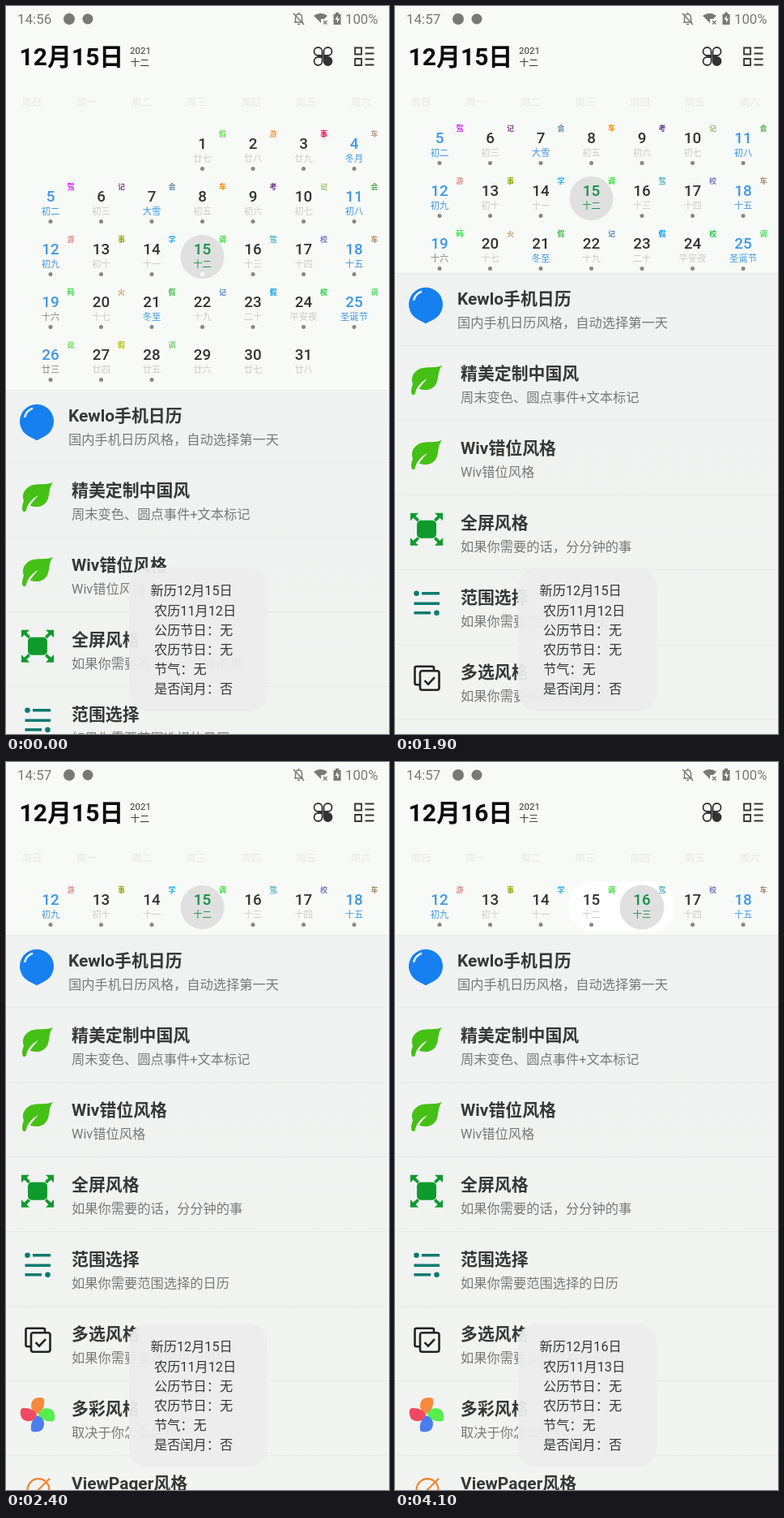
Write an HTML page that moves like this. It is 473 by 897 pixels and loops after 4400 ms.

```html
<!DOCTYPE html>
<html lang="zh-CN">
<head>
<meta charset="utf-8">
<title>日历</title>
<style>
html, body { margin: 0; width: 100%; height: 100%; overflow: hidden; background: #f7f9f7; }
svg { display: block; width: 473px; height: 897px; font-family: Roboto, "Noto Sans CJK SC", "Noto Sans CJK", sans-serif; }
text { white-space: pre; }
</style>
</head>
<body>
<svg id="stage" viewBox="0 0 473 897">
  <defs>
    <clipPath id="window"><rect y="141" width="473" height="756"/></clipPath>
    <linearGradient id="sheet" x2="0" y2="1">
      <stop stop-color="#eff2f0"/><stop offset="1" stop-color="#f2f4f2"/>
    </linearGradient>
    <path id="leaf" fill="#45c015" d="M58 -10C50 -6 40 -9 31 -6C22 -2 19 6 22 13C20 18 19.500 22 20.500 25C22 27.500 24.500 26.500 25 24C26 18 31 11 40 6C35 12 31 16 30 19C40 22.500 49 19 52 10C54 3 53 -3 58 -10Z"/>
  </defs>
  <rect width="473" height="897" fill="#f8faf8"/>
  <g id="bar"></g>
  <g id="head"></g>
  <g clip-path="url(#window)">
    <g id="month"></g>
    <g id="list"></g>
  </g>
  <g id="toast"></g>
</svg>
<script>
const LOOP = 4400;
const $ = id => document.getElementById(id);

function add(parent, tag, attrs, content) {
  const el = document.createElementNS('http://www.w3.org/2000/svg', tag);
  for (const k in attrs) el.setAttribute(k, attrs[k]);
  if (content !== undefined) el.textContent = content;
  parent.appendChild(el);
  return el;
}

// y is the visual middle of the line
const label = (parent, x, y, size, fill, content, more) =>
  add(parent, 'text', { x, y: y + size * .365, 'font-size': size, fill, ...more }, content);
const draw = (parent, d, stroke, width = 2, fill = 'none') =>
  add(parent, 'path', { d, stroke, 'stroke-width': width, fill });
const dot = (parent, cx, cy, r, fill) => add(parent, 'circle', { cx, cy, r, fill });
const mid = { 'text-anchor': 'middle' };

// Status bar
const bar = $('bar'), grey = '#777977';
const clock = label(bar, 14, 16, 17, grey, '14:56');
dot(bar, 78, 16, 7, grey);
dot(bar, 101, 16, 6.5, grey);
draw(bar, 'M356 20H367M357.500 20V14Q358 10 361.500 10Q365 10 365.500 14V20M361.500 8V10M360 22.500H363', grey, 1.5);
draw(bar, 'M355 9L368 23', grey, 1.5);
draw(bar, 'M380 12Q388.500 6 397 12L393 16H389V21Z', 'none', 0, grey);
draw(bar, 'M392 18L396.500 22.500M396.500 18L392 22.500', grey, 1.4);
draw(bar, 'M404.500 10H407V8H411V10H413.500V23H404.500Z', 'none', 0, grey);
draw(bar, 'M409.500 11.500L406.500 17H409V21L412 15.500H409.500Z', 'none', 0, '#f8faf8');
label(bar, 419, 16, 16.7, grey, '100%');

// Header
const head = $('head');
const date = label(head, 16.5, 62.5, 30, '#0c0c0c', '', { 'font-weight': 700 });
label(head, 153, 55, 11.5, '#333', '2021');
const lunarDate = label(head, 153.5, 70, 11.8, '#333', '');
const petal = 'a5 5 0 1 0 -5 5h5z';
[[1, 1], [-1, 1], [1, -1], [-1, -1]].forEach(([sx, sy], i) =>
  add(head, 'path', {
    d: 'M-1 -6' + petal, transform: `translate(391.500 62) scale(${sx} ${sy})`,
    fill: i === 3 ? '#333' : 'none', stroke: '#333', 'stroke-width': 1.8
  }));
draw(head, 'M431 51.500H439V59.500H431ZM431 65H439V73H431ZM443.500 51.500H454.500M443.500 58.500H454.500M443.500 65.500H454.500M443.500 72.500H454.500', '#333', 1.8);
[...'日一二三四五六'].forEach((d, i) =>
  label(head, 32 + i * 67.7, 118, 12.5, '#e5e8e6', '周' + d, mid));

// Month grid
const month = $('month');
const halo = add(month, 'rect', { x: 214, y: 277, width: 132, height: 62, rx: 30, fill: '#fff' });
const ring = dot(month, 242.5, 309, 27, '#dfe0df');
const BLUE = '#3f97e6', FAINT = '#c9cccb', GREEN = '#159048';
const lunar = ('廿七 廿八 廿九 冬月 初二 初三 大雪 初五 初六 初七 初八 初九 初十 十一 十二 十三 十四 十五 ' +
  '十六 十七 冬至 十九 二十 平安夜 圣诞节 廿三 廿四 廿五 廿六 廿七 廿八').split(' ');
const tags = '假游事车驾记会车考记会游事学调驾校车码火假记假校调议假调';
const hues = ('6d5 e94 f05 b98 c1e 848 68a e80 638 9b6 5a5 d88 8a0 2ae 3d3 4ab 77c a86 ' +
  '2d3 c96 4b4 58c 09e 2c4 4d5 6d4 bb0 7c7').split(' ');
const days = {};
lunar.forEach((name, i) => {
  const n = i + 1, col = (i + 3) % 7, row = Math.floor((i + 3) / 7);
  const x = 55 + col * 62.5, y = 169 + row * 65;
  const weekend = col === 0 || col === 6;
  const num = label(month, x, y, 18.8, weekend ? BLUE : '#333', n, { ...mid, 'font-weight': 500 });
  const subFill = n === 19 || n === 26 ? '#858986' : weekend || n === 7 || n === 21 ? BLUE : FAINT;
  const sub = label(month, x, y + 19, 11.3, subFill, name, mid);
  if (i < 28) {
    label(month, x + 25, y - 11, 9, '#' + hues[i], tags[i], { ...mid, 'font-weight': 700 });
    days[n] = { x, num, sub, mark: dot(month, x, y + 31.5, 2.5, '#858886') };
  }
});

// List
const list = $('list');
add(list, 'rect', { y: 473, width: 473, height: 760, fill: 'url(#sheet)' });
draw(list, 'M0 473.500H473', '#e8ebe9', 1);

const leaf = g => add(g, 'use', { href: '#leaf' });
const icons = [
  g => {
    draw(g, 'M27.800 25.400A21 21 0 1 1 48.200 25.400L38 30.500Z', 'none', 0, '#1680f0');
    draw(g, 'M23 2Q25 -6 33 -9', '#f2f8ff', 2.5);
  },
  leaf, leaf,
  g => {
    const green = '#0f9a2e';
    add(g, 'rect', { x: 27, y: -3, width: 24, height: 22, rx: 5, fill: green });
    for (const [sx, sy] of [[1, 1], [-1, 1], [1, -1], [-1, -1]])
      add(g, 'path', {
        d: 'M-20 -20H-10L-13.500 -16.500L-9 -12L-11.500 -9.500L-16.500 -14L-20 -10.500Z',
        transform: `translate(39 8) scale(${sx} ${sy})`, fill: green
      });
  },
  g => {
    const teal = '#0b7a70';
    draw(g, 'M33 -5H55M23.500 7.500H55M23.500 19H44', teal, 3.6);
    dot(g, 26.5, -5, 3.3, teal);
    dot(g, 51.5, 19, 3.3, teal);
  },
  g => {
    draw(g, 'M31 15.500H26.500Q24.500 15.500 24.500 13.500V-5Q24.500 -7 26.500 -7H46Q48 -7 48 -5V-1.500', '#222', 2.6);
    add(g, 'rect', { x: 31, y: -1.5, width: 23.5, height: 23.5, rx: 2.5, fill: 'none', stroke: '#222', 'stroke-width': 2.6 });
    draw(g, 'M36.500 10.500L41 15L49 6.500', '#222', 2.6);
  },
  g => ['#f5893d', '#55ee4e', '#4a7df0', '#f04a62'].forEach((fill, i) =>
    add(g, 'path', {
      d: 'M0 -1C-9 -4 -10 -13 -5 -19C0 -22 7 -22 8 -19C9 -11 6 -4 0 -1Z',
      transform: `translate(39 7.500) rotate(${i * 90})`, fill
    })),
  g => {
    add(g, 'circle', { cx: 40, cy: 8, r: 13.5, fill: 'none', stroke: '#f0852d', 'stroke-width': 2.2 });
    draw(g, 'M38 10L54 -6', '#f0852d', 2.2);
  }
];
[
  ['Kewlo手机日历', '国内手机日历风格，自动选择第一天'],
  ['精美定制中国风', '周末变色、圆点事件+文本标记'],
  ['Wiv错位风格', 'Wiv错位风格'],
  ['全屏风格', '如果你需要的话，分分钟的事'],
  ['范围选择', '如果你需要范围选择的日历'],
  ['多选风格', '如果你需要多选风格的日历'],
  ['多彩风格', '取决于你怎么绘制'],
  ['ViewPager风格', '如果你需要翻页的日历']
].forEach(([title, note], i) => {
  const g = add(list, 'g', { transform: `translate(0 ${504.7 + i * 92})` });
  const x = i ? 81 : 77;
  draw(g, 'M0 58H473', '#e7eae8', 1);
  icons[i](g);
  label(g, x, -.3, 20.9, '#363837', title, { 'font-weight': 700 });
  label(g, x, 29, 16.25, '#777a78', note);
});

// Toast
const toast = $('toast');
add(toast, 'rect', { x: 152, y: 692, width: 171, height: 177, rx: 23, fill: '#ededee', opacity: .94 });
const lines = [0, 1, 2, 3, 4, 5].map(i =>
  label(toast, i ? 183 : 178.6, 720.5 + i * 24.2, 16.2, '#343535', ''));

// Steps: [time, value], each held until the next
const SCROLL = [[0, 0], [1900, 144], [2000, 218], [2100, 257.5], [2200, 259], [2300, 260]];
const TOAST = [[0, 1], [1000, .5], [1100, 0], [1300, .35], [1400, .7], [1500, 1],
  [2800, .5], [2900, 0], [3000, .5], [3100, .85], [3300, 1],
  [3700, .8], [3800, .55], [3900, .55], [4000, .8], [4100, 1]];
const RADIUS = [[0, 27], [2800, 14], [2900, 18], [3000, 20], [3100, 22], [3300, 24], [3500, 27.5]];
const at = (steps, t) => steps.reduce((v, [time, value]) => t >= time ? value : v, 0);

let picked = 0;
function pick(day) {
  if (day === picked) return;
  picked = day;
  const name = lunar[day - 1];
  date.textContent = `12月${day}日`;
  lunarDate.textContent = name;
  [`新历12月${day}日`, `农历11月${day - 3}日`, '公历节日：无', '农历节日：无', '节气：无', '是否闰月：否']
    .forEach((s, i) => lines[i].textContent = s);
  for (const n of [15, 16]) {
    const on = n === day;
    days[n].num.setAttribute('fill', on ? GREEN : '#333');
    days[n].sub.setAttribute('fill', on ? GREEN : FAINT);
  }
  ring.setAttribute('cx', days[day].x);
  halo.setAttribute('opacity', day === 16 ? 1 : 0);
  days[16].mark.setAttribute('opacity', day === 16 ? 0 : 1);
}

function render(now) {
  const t = now % LOOP, y = at(SCROLL, t);
  clock.textContent = t < 100 ? '14:56' : '14:57';
  pick(t < 2800 ? 15 : 16);
  days[15].mark.setAttribute('fill', t < 700 ? '#fff' : t < 2800 ? 'none' : '#858886');
  ring.setAttribute('r', at(RADIUS, t));
  month.setAttribute('transform', `translate(0 ${-y / 2})`);
  list.setAttribute('transform', `translate(0 ${-y})`);
  toast.setAttribute('opacity', at(TOAST, t));
}

const start = performance.now();
function tick() {
  render(performance.now() - start);
  requestAnimationFrame(tick);
}
tick();
</script>
</body>
</html>
```
